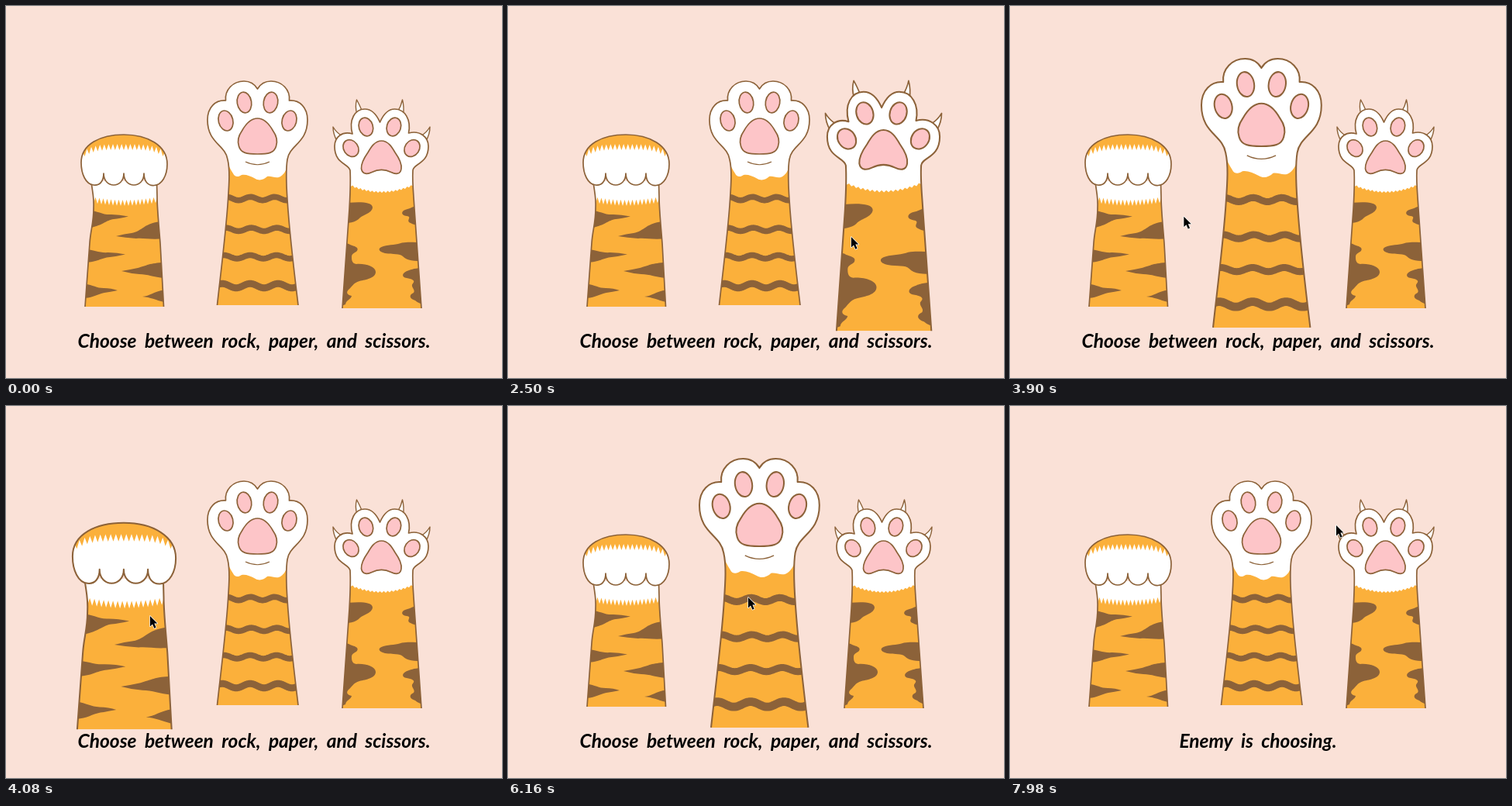
Recreate the animation shown at these times as an HTML page with a canvas. Size 640x480 px, loop 8 s.

```html
<!DOCTYPE html>
<html lang="en">
<head>
<meta charset="utf-8">
<title>Rock, paper, scissors</title>
<style>
html, body { margin: 0; width: 100%; height: 100%; overflow: hidden; background: #fae1d7; }
canvas { display: block; width: 640px; height: 480px; }
</style>
</head>
<body>
<canvas id="stage" width="640" height="480"></canvas>
<script>
const ctx = document.getElementById('stage').getContext('2d');
const LOOP = 8000;
const BG = '#fae1d7', ORANGE = '#fbb03b', BROWN = '#8c6239', PINK = '#fdc5c8', WHITE = '#fff';
const PROMPT = 'Choose between rock, paper, and scissors.';
const WAITING = 'Enemy is choosing.';
const CHOSEN_AT = 7300;

// Cursor tip: time, x, y
const track = [
  [1380, 645, 330], [1640, 545, 316], [2120, 462, 302], [2220, 456, 300],
  [2500, 443, 298], [2640, 385, 288], [2960, 315, 277], [3100, 309, 274],
  [3500, 290, 273], [3800, 247, 272], [4080, 186, 271], [4350, 166, 269],
  [4640, 155, 266], [4740, 144, 256], [5040, 144, 256], [5350, 190, 247],
  [5600, 260, 240], [5860, 305, 245], [6160, 310, 247], [7260, 310, 247],
  [7980, 421, 154], [8000, 421, 154]
];

// Which paw is raised from each moment on
const hovers = [[0, ''], [1660, 'scissors'], [2640, 'paper'], [3960, 'rock'], [5650, 'paper'], [CHOSEN_AT, '']];

const P = d => new Path2D(d);

function fill(path, color) {
  ctx.fillStyle = color;
  ctx.fill(path);
}

function line(path, width = 1.7) {
  ctx.lineWidth = width;
  ctx.strokeStyle = BROWN;
  ctx.stroke(path);
}

function clipped(path, draw) {
  ctx.save();
  ctx.clip(path);
  draw();
  ctx.restore();
}

// Area between y = top and a toothed lower edge
function fringe(x0, x1, step, top, edge, amp) {
  const p = new Path2D();
  p.moveTo(x0, top);
  for (let x = x0, up = 1; x <= x1; x += step / 2, up = -up) p.lineTo(x, edge(x) + up * amp);
  p.lineTo(x1, top);
  p.closePath();
  return p;
}

function wave(y, amp, period, dip) {
  const p = new Path2D();
  for (let x = 262; x <= 388; x += 2) p.lineTo(x, y + amp * Math.cos((x - dip) * 2 * Math.PI / period));
  return p;
}

// A toe bean and its mirror image about cx
function beans(cx, dx, y, rx, ry, tilt) {
  for (const s of [-1, 1]) {
    const p = new Path2D();
    p.ellipse(cx + s * dx, y, rx, ry, s * tilt, 0, 7);
    fill(p, PINK);
    line(p);
  }
}

const rock = {
  cx: 152.5, cy: 242,
  arm: P('M110,226 C111,238 114,246 113,262 C113,280 109,290 108,306 L102,388 L203.5,388 L199,306 C197,280 195,262 195,246 L194,226'),
  sides: P('M110,226 C111,238 114,246 113,262 C113,280 109,290 108,306 L102,388 M203.5,388 L199,306 C197,280 195,262 195,246 L194.5,226'),
  mitt: P('M97,202 C97,178 122,166 152,166 C183,166 208,180 208,204 C208,219 201,231 191,231.5 C183,232 178,226 178,216 C178,236 152,236 152,216 C152,236 126,236 126,216 C126,226 121,232 113,231 C103,230 97,217 97,202 Z'),
  stripes: P('M104,264 C118,263 124,270 136,269 Q146,269 158,271.5 Q147,274 139,275 C129,276 125,284 104,287 Z' +
    'M142,297 Q153,294 162,293 C176,291 178,279 203,278 V300 C188,302 178,299 168,300 Q154,299 142,297 Z' +
    'M100,314 C113,314 120,319 132,318 Q144,318 154,320.5 Q143,323 134,324 C122,325 118,331 100,331 Z' +
    'M149,342 Q161,340 170,338 C182,335 186,331 208,331 V351 C192,351 184,346 172,346 Q160,345 149,342 Z' +
    'M98,358 C111,359 116,364 126,364 Q136,364 144,367 Q134,369 127,370 C117,372 112,377 98,377 Z' +
    'M176,375 C186,374 192,367 208,366 V383 C194,380 188,376 176,375 Z'),
  cuff: fringe(108, 200, 5, 220, x => 254 - 4 * ((x - 153) / 42) ** 2, 4),
  cap: fringe(96, 211, 5.6, 150, x => 182 + 9 * ((x - 152) / 52) ** 4, 4),
  draw() {
    clipped(this.arm, () => {
      fill(this.arm, ORANGE);
      fill(this.stripes, BROWN);
      fill(this.cuff, WHITE);
    });
    line(this.sides);
    fill(this.mitt, WHITE);
    clipped(this.mitt, () => fill(this.cap, ORANGE));
    line(this.mitt);
  }
};

const paper = {
  cx: 325, cy: 241.5,
  body: P('M272.5,386 C277,345 284,290 286.5,250 C288,228 289,211 286,198 C283,179 260,177 260,147 C260,131 270,121 283.5,122 C282,108 293,97 307,97 C315,97 321,101 324.5,107 C328,101 334,97 342,97 C356,97 367,108 365.5,122 C379,121 389,131 389,147 C389,177 366,179 363,198 C361,211 361.5,228 363,250 C365.5,290 372,345 377,386'),
  pad: P('M324.5,145 C334,145 340,153 344.5,161 C349.5,168 350.5,175 348.5,181 C346,190 338,191 324.5,191 C311,191 303,190 300.5,181 C298.5,175 299.5,168 304.5,161 C309,153 315,145 324.5,145 Z'),
  smile: P('M309,201 Q324.5,208.5 340,201'),
  fur: P('M250,80 H400 V195 L364,203 C362,212 358,219 352,221 C346,222 342,219 337,220 C333,224 327,226 322,223 C315,219 309,217 304,218 C300,221 295,221 293,216 C290,212 288,207 286,203 L250,195 Z'),
  bands: [wave(248.5, 2.2, 31, 300), wave(288.3, 2.2, 33, 300), wave(323.7, 2.2, 34, 298), wave(361, 2.8, 36, 297)],
  draw() {
    clipped(this.body, () => {
      fill(this.body, ORANGE);
      this.bands.forEach((b, i) => line(b, i < 3 ? 7.5 : 9));
      fill(this.fur, WHITE);
    });
    line(this.body);
    beans(324.5, 41, 148, 9.3, 13.2, 0.25);
    beans(324.5, 17, 124.5, 9.2, 13.4, 0.16);
    fill(this.pad, PINK);
    line(this.pad);
    line(this.smile, 1.2);
  }
};

const scissors = {
  cx: 484.5, cy: 244,
  claws: P('M427,174 Q422,165 422,156 Q426,163 434,168 M453,140 Q450,130 452.5,121 Q456,127 460,137' +
    'M505,137 Q510,129 511.5,121 Q514,130 512.5,141 M535,168 Q543,163 547,156 Q547,165 542,174'),
  body: P('M434,390 L443,262 C444,244 445,228 444,212 C442,203 424,204 424,181 C424,169 434,161 447,165 C442,147 450,133 463,133 C473,133 479,142 482.5,150 C486,142 492,133 501.5,133 C515,133 523,147 519.5,164 C534,160 545,169 545,181 C545,204 526,203 525,212 C524,228 526,244 527,262 L536,390'),
  pad: P('M484.5,174 C493,174 498,182 502,189 C507,196 511,203 510,210 C509,218 502,217 497,214.5 C489,210.5 480,210.5 472,214.5 C467,217 460,218 458.5,210 C458,203 462,196 467,189 C471,182 476,174 484.5,174 Z'),
  fur: fringe(415, 555, 5, 110, x => 240 - 9 * ((x - 484.5) / 41) ** 2, 1.1),
  patches: P('M430,255 C448,253 473,251 473,260 C472,268 460,269 455,275 C450,279 444,280 430,281 Z' +
    'M540,256 C528,256 523,261 518,262 C509,264 509,270 517,271 C525,272 515,277 522,280 Q527,283 540,284 Z' +
    'M540,305 C526,305 519,304 511,305.5 C505,308 495,308 487,310 C479,312 480,317 489,319 C500,321 508,319 512,323 C518,329 526,329 540,329 Z' +
    'M425,306 C434,308 440,305 444,308 C449,310 456,311 453,316 C450,319 446,319 446,324 C446,329 447,332 452,333 C463,332 477,336 477,343 C477,351 465,353 456,355 C448,357 446,363 442,366 C438,370 441,373 446,374 C445,379 439,379 438,385 L425,390 Z' +
    'M545,337 C530,338 526,339 520,341 C510,344 510,350 517,351 C523,352 529,354 525,358 C521,362 529,366 526,370 C519,373 521,378 528,380 Q533,385 545,386 Z'),
  draw() {
    fill(this.claws, WHITE);
    line(this.claws, 1.4);
    clipped(this.body, () => {
      fill(this.body, ORANGE);
      fill(this.patches, BROWN);
      fill(this.fur, WHITE);
    });
    line(this.body);
    beans(484.5, 39.5, 183.5, 9.3, 11.6, 0.6);
    beans(482.4, 18, 156, 9, 12, 0.3);
    fill(this.pad, PINK);
    line(this.pad);
  }
};

const paws = { rock, paper, scissors };
const arrow = P('M0,0 V13.4 L3.1,10.5 L5.4,15.8 L7.7,14.8 L5.4,9.6 H9.4 Z');

// Smooth, overshoot-free value of one track column
function along(t, col) {
  let i = 0;
  while (i < track.length - 2 && track[i + 1][0] <= t) i++;
  const slope = k => k < 0 || k > track.length - 2 ? 0 :
    (track[k + 1][col] - track[k][col]) / (track[k + 1][0] - track[k][0]);
  const tangent = k => {
    const a = slope(k - 1), b = slope(k);
    return a * b > 0 ? 2 * a * b / (a + b) : 0;
  };
  const [a, b] = [track[i], track[i + 1]];
  const h = b[0] - a[0], u = (t - a[0]) / h, v = 1 - u;
  return a[col] * (1 + 2 * u) * v * v + tangent(i) * h * u * v * v +
    b[col] * (3 - 2 * u) * u * u - tangent(i + 1) * h * u * u * v;
}

function drawPaw(paw, scale) {
  ctx.save();
  ctx.translate(paw.cx, paw.cy);
  ctx.scale(scale, scale);
  ctx.translate(-paw.cx, -paw.cy);
  paw.draw();
  ctx.restore();
}

function drawCursor(t) {
  if (t < track[0][0]) return;
  ctx.save();
  ctx.translate(along(t, 1), along(t, 2));
  ctx.lineWidth = 1.4;
  ctx.strokeStyle = WHITE;
  ctx.stroke(arrow);
  fill(arrow, '#000');
  ctx.restore();
}

function render(t) {
  ctx.fillStyle = BG;
  ctx.fillRect(0, 0, 640, 480);
  ctx.lineJoin = 'round';

  const raised = hovers.filter(h => h[0] <= t).pop()[1];
  for (const name in paws) drawPaw(paws[name], name === raised ? 1.2 : 1);

  ctx.font = 'italic 700 24.5px Lato, "Open Sans", sans-serif';
  ctx.wordSpacing = '5px';
  ctx.textAlign = 'center';
  ctx.fillStyle = '#000';
  ctx.fillText(t < CHOSEN_AT ? PROMPT : WAITING, 320, 441);

  drawCursor(t);
}

function tick() {
  render(performance.now() % LOOP);
  requestAnimationFrame(tick);
}
tick();
</script>
</body>
</html>
```
